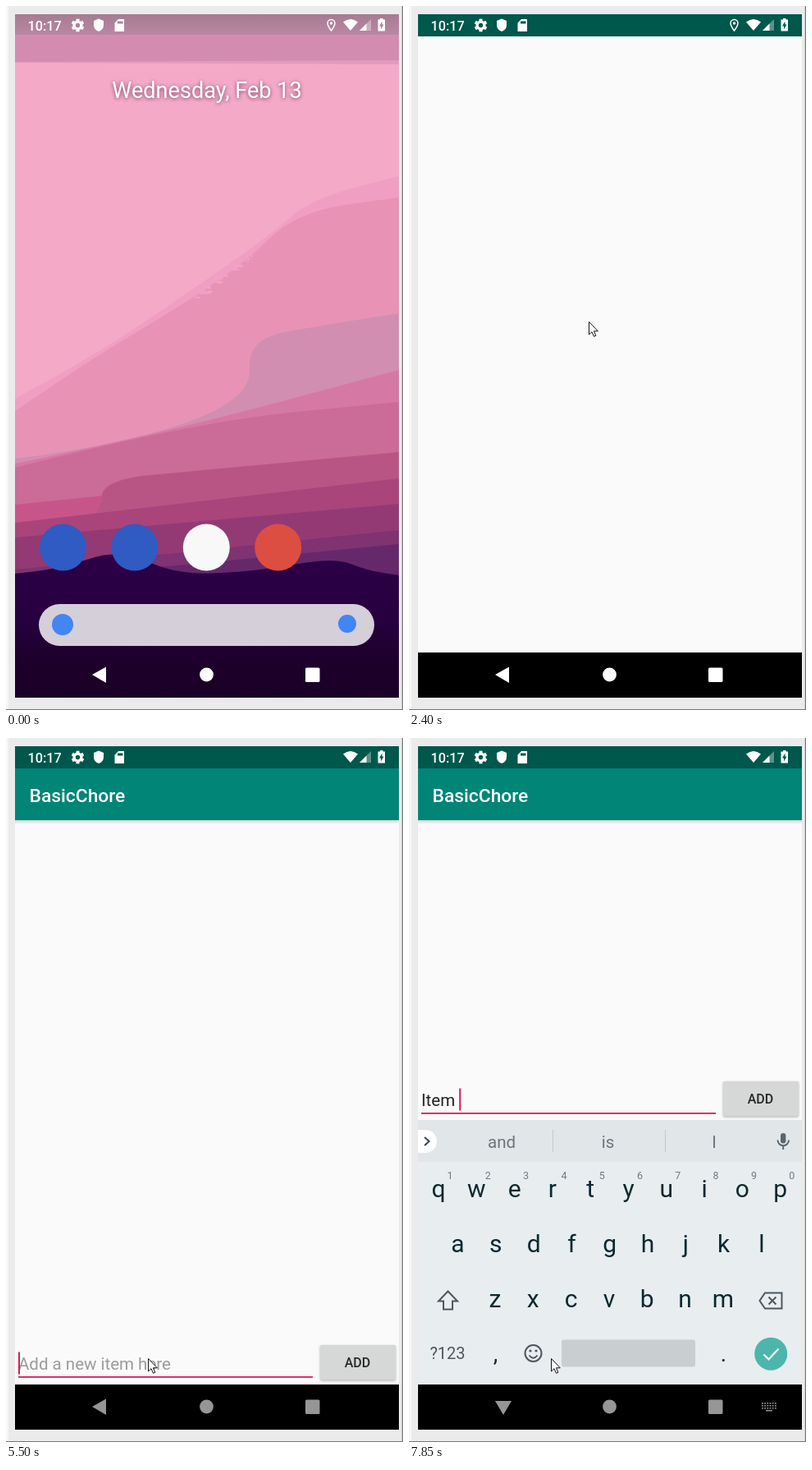
Recreate the animation shown at these times as an HTML page with a canvas. Size 484x857 px, loop 8000 ms.

```html
<!DOCTYPE html>
<html lang="en">
<head>
<meta charset="utf-8">
<title>To-do app</title>
<style>
html, body { margin: 0; width: 100%; height: 100%; overflow: hidden; background: #ebebec; }
canvas { display: block; }
</style>
</head>
<body>
<canvas id="stage" width="484" height="857"></canvas>
<script>
const ctx = document.getElementById('stage').getContext('2d');
const FONT = 'Roboto, "Noto Sans", sans-serif';
const ACCENT = '#d81b60';
const PITCH = 46.3; // distance between keyboard keys

// Moments of the loop, in ms
const LOOP = 8000, ENTER = 1310, OPEN = 2400, READY = 3450, SETTLED = 3570, FOCUS = 5350, KEYS = 5780;
const TYPED = 'Item ', PRESSES = [7030, 7310, 7460, 7580, 7850];

const clamp = v => Math.min(1, Math.max(0, v));
const progress = (t, from, to) => clamp((t - from) / (to - from));
const mix = (a, b, k) => a + (b - a) * k;
const smooth = k => k * k * (3 - 2 * k);

const held = t => 1300 + Math.floor((t - 1300) / 135) * 135;

function rect(x, y, w, h, color) {
  ctx.fillStyle = color;
  ctx.fillRect(x, y, w, h);
}

function round(x, y, w, h, r, color) {
  ctx.fillStyle = color;
  ctx.beginPath();
  ctx.roundRect(x, y, w, h, r);
  ctx.fill();
}

function disc(x, y, r, color) {
  ctx.fillStyle = color;
  ctx.beginPath();
  ctx.arc(x, y, r, 0, 7);
  ctx.fill();
}

function shape(d, color) {
  ctx.fillStyle = color;
  ctx.fill(new Path2D(d), 'evenodd');
}

function outline(d, color, width) {
  ctx.strokeStyle = color;
  ctx.lineWidth = width;
  ctx.stroke(new Path2D(d));
}

function text(s, x, y, size, color, align = 'left', weight = 400) {
  ctx.font = `${weight} ${size}px ${FONT}`;
  ctx.textAlign = align;
  ctx.fillStyle = color;
  ctx.fillText(s, x, y);
}

function shadow(color, blur, dy) {
  ctx.shadowColor = color;
  ctx.shadowBlur = blur;
  ctx.shadowOffsetY = dy;
}

function fade(y0, y1, from, to) {
  const g = ctx.createLinearGradient(0, y0, 0, y1);
  g.addColorStop(0, from);
  g.addColorStop(1, to);
  rect(11, y0, 468, y1 - y0, g);
}

// Fills everything below a soft line through a few points.
function ridge(color, ...points) {
  const last = points.length - 1;
  ctx.fillStyle = color;
  ctx.beginPath();
  ctx.moveTo(...points[0]);
  for (let i = 1; i < last; i++) {
    const [x, y] = points[i], [nx, ny] = points[i + 1];
    ctx.quadraticCurveTo(x, y, (x + nx) / 2, (y + ny) / 2);
  }
  ctx.lineTo(...points[last]);
  ctx.lineTo(479, 842);
  ctx.lineTo(11, 842);
  ctx.fill();
}

const band = (color, left, right) => ridge(color, [11, left], [479, right]);

function specks() {
  let seed = 5;
  const rand = () => (seed = seed * 16807 % 2147483647) / 2147483647;
  for (let i = 0; i < 34; i++) {
    const k = rand();
    rect(230 + k * 68, 352 - k * 48 + rand() * 14 - 7, 2 + rand() * 6, 1 + rand() * 2, '#f1a3c4');
  }
}

function wallpaper() {
  rect(11, 10, 468, 832, '#d38cb0');
  band('#e09bbc', 68, 66);
  band('#f4a9c7', 69, 71);
  fade(10, 35, '#a57c92', '#bb86a3');

  ridge('#f09fc3', [11, 478], [100, 430], [200, 364], [325, 277], [372, 235], [479, 207]);
  ridge('#e893b5', [11, 493], [100, 432], [200, 373], [290, 314], [355, 250], [479, 233]);
  specks();
  ridge('#d28eb1', [11, 551], [145, 534], [300, 478], [294, 405], [390, 388], [479, 374]);
  ridge('#d678a4', [11, 557], [180, 523], [479, 443]);
  ridge('#cb6b97', [11, 562], [230, 506], [479, 482]);
  band('#c85589', 607, 560);
  ridge('#b85584', [117, 602], [112, 577], [240, 565], [479, 543]);
  band('#a9457a', 629, 575);
  band('#933a75', 647, 606);
  band('#7f3371', 686, 638);
  band('#65296b', 700, 655);
  const night = ctx.createLinearGradient(0, 670, 0, 842);
  night.addColorStop(0, '#2c0047');
  night.addColorStop(0.45, '#27003f');
  night.addColorStop(0.75, '#1d002b');
  night.addColorStop(1, '#1b0026');
  ridge(night, [11, 691], [60, 687], [140, 660], [205, 692], [300, 689], [400, 671], [440, 687], [479, 693]);
}

function home() {
  wallpaper();
  ctx.save();
  shadow('rgba(60,20,45,.7)', 5, 1);
  text('Wednesday, Feb 13', 245, 112, 27.1, '#fff', 'center');
  ctx.restore();
  ['#2f5bc3', '#2f5bc3', '#f8f8f8', '#dc4e41'].forEach((c, i) => disc(69.5 + i * 87.4, 659, 28.5, c));
  round(40, 728, 409, 51, 25.5, '#d5cfd9');
  disc(69, 753, 13, '#4285f4');
  disc(416, 752, 11, '#4285f4');
}

function gear(x, y, color) {
  for (let i = 0; i < 6; i++) {
    ctx.save();
    ctx.translate(x, y);
    ctx.rotate(i * Math.PI / 3);
    rect(-2, -7.8, 4, 4, color);
    ctx.restore();
  }
  ctx.strokeStyle = color;
  ctx.lineWidth = 3.4;
  ctx.beginPath();
  ctx.arc(x, y, 4.4, 0, 7);
  ctx.stroke();
}

function statusBar(t) {
  const w = '#fff';
  text('10:17', 26.5, 29.5, 16.2, w, 'left', 500);
  gear(87.5, 23.5, w);
  shape('M113 15.5L119 18V23Q119 29 113 31Q107 29 107 23V18Z', w);
  shape('M137 16H144V31H132.5V20.5ZM136 18.5V21.5H142.5V18.5Z', w);
  if (t < 3700) {
    outline('M396.5 30Q392 24 392 21A4.5 4.5 0 0 1 401 21Q401 24 396.5 30Z', w, 1.5);
    disc(396.5, 21, 1.7, w);
  }
  shape('M411 19.5Q420 12.5 429 19.5L420 30Z', w);
  shape('M445 16V30H431Z', 'rgba(255,255,255,.35)');
  shape('M439.5 21.5V30H431Z', w);
  shape('M456 15H459.5V16.5H462V30.5H453.5V16.5H456ZM458.5 18.5L455 24.5H457V28.5L460.5 22.5H458.5Z', w);
}

function navBar(t) {
  const typing = t >= KEYS;
  ctx.save();
  ctx.globalAlpha = mix(1, 0.59, progress(held(t), 3000, 3540));
  shape(typing ? 'M105 807H125L115 824Z' : 'M105 814L122 804.5V824Z', '#fff');
  disc(244.5, 814, 8.4, '#fff');
  round(365, 805.5, 17.5, 17.5, 1.5, '#fff');
  if (typing) {
    for (let i = 0; i < 18; i++) rect(430 + i % 6 * 3.2, 809 + Math.floor(i / 6) * 3, 1.8, 1.6, '#fff');
    rect(435, 818, 8, 1.5, '#fff');
  }
  ctx.restore();
}

function inputRow(t, pressed) {
  const value = TYPED.slice(0, pressed);
  if (value) text(value, 15, 769, 20.5, '#212121');
  else text('Add a new item here', 15, 769, 20.5, '#9b9b9b');
  const width = value ? ctx.measureText(value).width : 0;
  const composing = value && pressed < TYPED.length;
  if (composing) rect(15, 772, width, 1.2, '#303030');
  if (t >= FOCUS) rect(15, 777, 359, 1.8, ACCENT);
  else rect(15, 777, 359, 1, '#777');
  const blinkedOff = t >= 6050 && t < 6450;
  if (t >= 5500 && !blinkedOff) rect(15 + width, 747.5, 2, 27, ACCENT);

  ctx.save();
  shadow('rgba(0,0,0,.3)', 3, 1);
  round(383, 739, 92, 42.5, 2, '#d6d7d7');
  ctx.restore();
  text('ADD', 428.5, 766, 16, '#262626', 'center', 500);
}

function keyRow(keys, x, y, size = 30, color = '#0c2830') {
  [...keys].forEach((k, i) => text(k, x + i * PITCH, y, size, color, 'center'));
}

function suggestions(pressed) {
  rect(11, 465, 468, 51, '#e1e6e9');
  if (pressed < 4) {
    text('Suggest contacts? Tap for info.', 243.5, 498, 18.2, '#4db6ac', 'center');
  } else {
    const words = pressed < 5 ? ['Items', 'Item', 'Itemized'] : ['and', 'is', 'I'];
    words.forEach((w, i) => text(w, 113 + i * 129.5, 499, 20.5, '#6c757a', 'center'));
    for (const x of [175, 312]) rect(x, 477, 1, 27, '#c3c9cc');
  }
  round(11, 477, 23, 28, [0, 14, 14, 0], '#fff');
  outline('M19 486L24.5 491L19 496', '#37474f', 2);
  round(453, 481, 6.4, 12.5, 3.2, '#5b666c');
  outline('M449.5 489.5A6.7 6.7 0 0 0 463 489.5M456.2 496V501', '#5b666c', 2);
}

function keyboard(pressed) {
  const ink = '#4c585e';
  rect(11, 465, 468, 322, '#e8edf0');
  suggestions(pressed);
  keyRow('qwertyuiop', 36, 559);
  keyRow('1234567890', 50, 537, 12.5, '#6f7a80');
  keyRow('asdfghjkl', 59.5, 626);
  keyRow('zxcvbnm', 105, 693);
  outline('M47.5 673.5L36 685.5H42V695.5H53V685.5H59Z', ink, 2);
  outline('M434 675.5H454.5V694.5H434L427.5 685ZM438.5 680.5L447.5 689.5M447.5 680.5L438.5 689.5', ink, 2);

  text('?123', 47, 756, 20, ink, 'center');
  keyRow(',', 105.5, 759, 28);
  keyRow('.', 383.5, 759, 28);
  outline('M161.5 749A10 10 0 1 1 141.5 749A10 10 0 1 1 161.5 749M146.5 751.5Q151.5 758 156.5 751.5', ink, 2);
  for (const x of [148, 155]) disc(x, 746, 1.6, ink);
  round(186, 732.5, 163, 33, 3, '#c9ced1');
  disc(441.2, 749.7, 20, '#4db6ac');
  outline('M432.5 750.5L438.5 756.5L450.5 743.5', '#fff', 2.2);
}

function app(t) {
  const pressed = PRESSES.filter(p => p <= t).length;
  rect(11, 10, 468, 832, '#fafafa');
  rect(11, 10, 468, 27, '#00574b');
  if (t >= READY) {
    ctx.save();
    ctx.globalAlpha = t < SETTLED ? 0.875 : 1;
    rect(11, 37, 468, 63, '#008577');
    fade(100, 105, 'rgba(0,0,0,.15)', 'rgba(0,0,0,0)');
    text('BasicChore', 28.5, 77.5, 22.8, '#fff', 'left', 500);
    if (t >= KEYS) ctx.translate(0, -321);
    inputRow(t, pressed);
    ctx.restore();
  }
  if (t >= KEYS) {
    const rising = t < KEYS + 120;
    ctx.save();
    ctx.globalAlpha = rising ? 0.75 : 1;
    ctx.translate(0, rising ? 30 : 0);
    keyboard(pressed);
    ctx.restore();
  }
  rect(11, 787, 468, 55, '#000');
}

function pointerAt(t) {
  if (t < 1560) {
    const k = progress(t, 1300, 1570);
    return [mix(1, 107, k), mix(411, 401, k)];
  }
  if (t < 4270) {
    const k = smooth(progress(t, 1570, 2515) ** 2);
    return [mix(107, 242, k), mix(401, 380, k)];
  }
  // A bowed sweep down to the text field
  const k = 1 - (1 - progress(t, 4270, 4945)) ** 1.7;
  return [mix(mix(242, 117, k), mix(117, 173, k), k), mix(380, 755, k)];
}

function pointer(t) {
  if (t < ENTER) return;
  const arrow = 'M.5 .5V16L4 12.7L6.5 18.3L8.8 17.3L6.4 11.8H11.3Z';
  ctx.save();
  ctx.translate(...pointerAt(held(t)).map(Math.round));
  shape(arrow, '#fff');
  outline(arrow, '#111', 1);
  ctx.restore();
}

function bezel() {
  rect(0, 0, 484, 857, '#ebebec');
  rect(0, 0, 3, 857, '#f7f7f7');
  rect(482, 0, 1, 857, '#d2d2d2');
  rect(483, 0, 1, 857, '#747474');
  rect(0, 856, 484, 1, '#747474');
}

function draw(t) {
  bezel();
  if (t < OPEN) home();
  else app(t);
  statusBar(t);
  navBar(t);
  pointer(t);
}

const start = performance.now();
function tick() {
  draw((performance.now() - start) % LOOP);
  requestAnimationFrame(tick);
}
tick();
</script>
</body>
</html>
```
